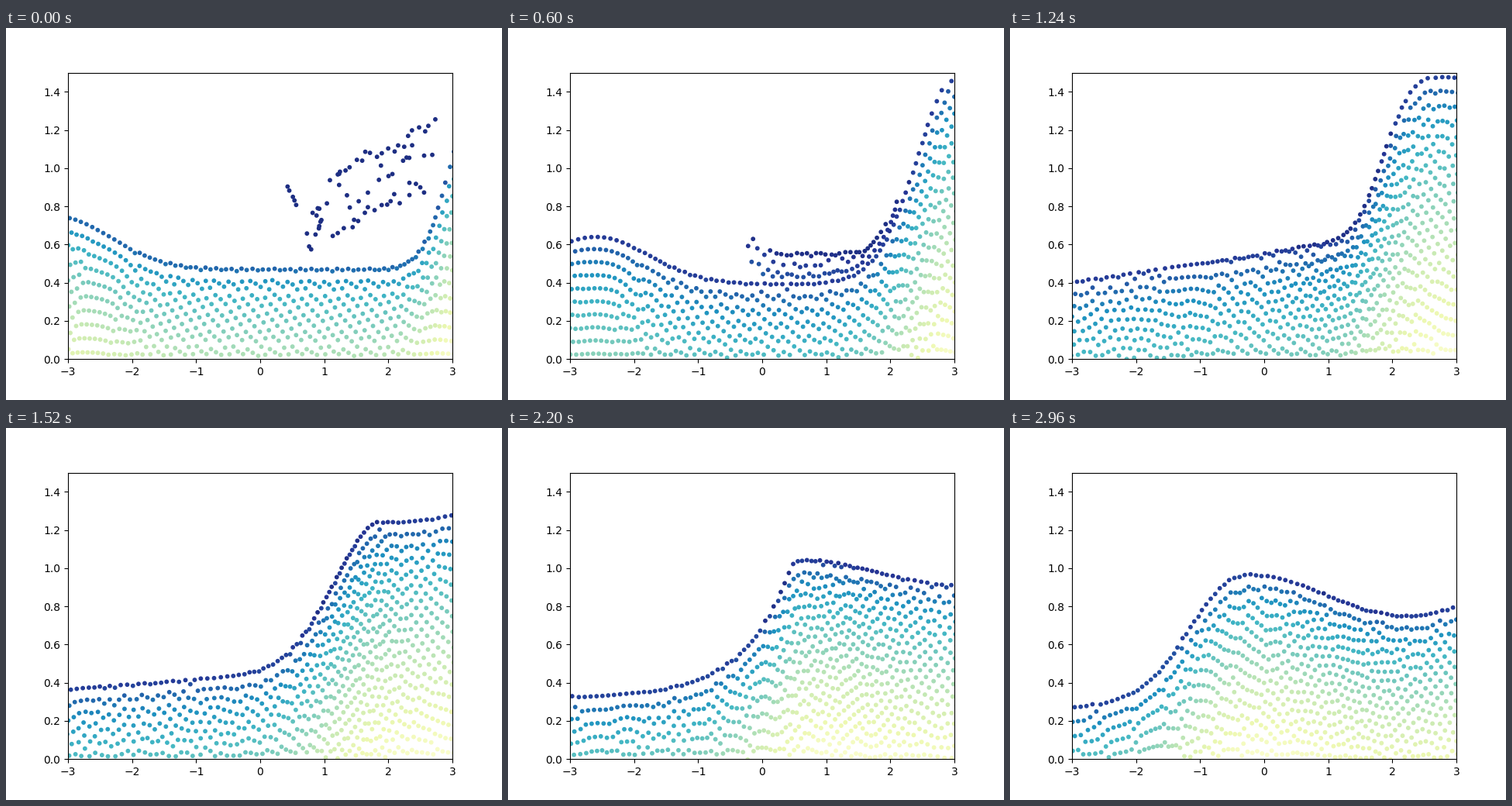
Write a matplotlib script that moves like this. It is 640 px wide and 480 px high and loops after 3000 ms.

```python
import numpy as np
import matplotlib.pyplot as plt
from matplotlib.animation import FuncAnimation

FRAMES, STEP = 75, 0.04
FLOOR = -0.05                       # the lowest row lies just below the axis
CELL = 0.0055                       # area per particle
GAP = np.sqrt(CELL * 1.155)         # spacing of an even packing
REACH = 1.3 * GAP
PUSH = 0.012
SPEED, REST = -1.4, 0.65            # wave speed and mean depth
LAND, SETTLE = 0.6, 0.8             # spray comes down, then joins the water

# Wave shape over time: crest position and height, level ahead of it,
# length and sharpness of the front, rise of the back
TIMES = [0, 0.6, 1.24, 1.8, 2.2, 2.52, 2.96]
WAVE = dict(
    crest=[3.2, 2.93, 2.75, 1.0, 0.5, 0.2, -0.3],
    height=[1.25, 1.47, 1.49, 1.0, 1.05, 1.05, 0.975],
    level=[0.48, 0.40, 0.41, 0.34, 0.33, 0.32, 0.28],
    length=[0.45, 0.78, 1.0, 1.0, 0.75, 0.95, 1.2],
    power=[1.6, 1.7, 3.0, 0.8, 1.0, 1.6, 2.0],
    back=[0, 0, 0, 0.2, -0.13, -0.23, -0.22],
)

GRID = np.linspace(-6, 6, 1201)
DX = GRID[1] - GRID[0]
BED = np.full_like(GRID, FLOOR)
rng = np.random.default_rng(4)


def at(x, values):
    return np.interp(x, GRID, values)


def blur(h, sigma):
    n = int(3 * sigma / DX)
    w = np.exp(-0.5 * (np.arange(-n, n + 1) * DX / sigma) ** 2)
    return np.convolve(np.pad(h, n, mode="edge"), w / w.sum(), mode="valid")


def surface(t):
    w = {name: np.interp(t, TIMES, v) for name, v in WAVE.items()}
    swell = 0.28 * max(1 - (t / 1.24) ** 3, 0)
    tilt = 0.05 * np.clip((t - LAND) / 0.2, 0, 1) * np.clip((1.8 - t) / 0.56, 0, 1)
    base = w["level"] + tilt * np.clip(GRID + 3, 0, 5)
    base += swell * np.exp(-((GRID + 3.2 - t) / 1.2) ** 2)
    ahead = np.clip(w["crest"] - GRID, 0, None)
    behind = np.clip(GRID - w["crest"], 0, 3.5)
    top = w["height"] + w["back"] * (1 - np.cos(np.pi * behind / 2.5)) / 2
    front = np.exp(-(ahead / w["length"]) ** w["power"])
    return blur(base + (top - base) * front, 0.04)


def relax(p, bed, top, lo, hi, rounds):
    """Spread particles evenly between bed and top by soft repulsion."""
    n = len(p)
    near = np.arange(-42, 43)
    for _ in range(rounds):
        q = p[np.argsort(p[:, 0], kind="stable")]
        other = q[(np.arange(n)[:, None] + near) % n]
        dx = q[:, :1] - other[..., 0]
        dy = q[:, 1:] - other[..., 1]
        r = np.sqrt(dx * dx + dy * dy) + 1e-6
        w = PUSH * np.clip(1 - r / REACH, 0, None) / r
        a, b = at(q[:, 0], bed), at(q[:, 0], top)
        # Mirror images across both limits keep rows from piling up there
        down, up = (PUSH * np.clip(1 - (2 * np.abs(d) + 0.6 * GAP) / REACH, 0, None)
                    for d in (b - q[:, 1], q[:, 1] - a))
        x = np.clip(q[:, 0] + (dx * w).sum(1), lo, hi)
        y = q[:, 1] + (dy * w).sum(1) + up - down
        p = np.column_stack([x, np.clip(y, at(x, bed), at(x, top))])
    return p


def streak(a, b, n, jitter):
    s = np.linspace(0, 1, n)[:, None]
    return np.array(a) + (np.array(b) - a) * s + rng.normal(0, jitter, (n, 2))


def throw_spray():
    """A hollow sheet curling off the crest, with a few stray drops ahead."""
    return np.vstack([
        streak((1.1, 0.94), (2.72, 1.24), 21, 0.018),
        streak((1.15, 0.66), (2.6, 0.92), 19, 0.025),
        streak((1.1, 0.82), (2.65, 1.07), 17, 0.06),
        streak((0.74, 0.61), (0.95, 0.79), 12, 0.04),
        streak((0.43, 0.89), (0.57, 0.81), 5, 0.01),
    ])


def land_spray(start):
    """Resting places: a thin layer on top of the water."""
    water = surface(LAND)
    bed = water + 0.025
    top = 0.56 + 0.09 * np.exp(-((GRID + 0.1) / 0.2) ** 2)
    top = np.maximum(top, bed + 0.05)
    x = start[:, 0] - 0.65
    f = np.clip((start[:, 1] - 0.6) / 0.4, 0, 1) ** 0.7
    y = at(x, bed) + f * (at(x, top) - at(x, bed))
    order = np.argsort(x)
    end = np.empty_like(start)
    end[order] = relax(np.column_stack([x, y]), bed, top, -0.22, 2.1, 40)[:len(x)]
    return end, top


def shade(p, t, h):
    wide = blur(h, 0.45)
    depth = np.clip(at(p[:, 0], h) - p[:, 1], 0, None)
    depth *= at(p[:, 0], wide) / at(p[:, 0], h)
    rel = np.clip(depth / wide[np.abs(GRID) <= 3].max(), 0, 1)
    skin = 0.1 + 0.12 * max(1 - t / 0.4, 0)
    return skin + (0.97 - skin) * rel ** 0.57


def simulate():
    heights = [surface(i * STEP) for i in range(FRAMES)]
    mass, inflow = [], 0.0
    for h in heights:
        m = np.cumsum(h - FLOOR) * DX
        mass.append(m - at(-3, m) - inflow)
        inflow += SPEED * (at(-3, h) - REST) * STEP
    m_lo = min(at(-3, m) for m in mass) - 0.05
    m_hi = max(at(3, m) for m in mass) + 0.05

    # Even start: columns of equal mass, golden-ratio depths
    n = int((m_hi - m_lo) / CELL)
    k = np.arange(n)
    x = np.interp(m_lo + (m_hi - m_lo) * (k + 0.5) / n, mass[0], GRID)
    y = FLOOR + (at(x, heights[0]) - FLOOR) * (k * 0.618034 % 1)
    p = np.column_stack([x, y])

    start = throw_spray()
    end, layer = land_spray(start)
    air = np.ones(len(start), bool)
    out = []
    for i, (h, m) in enumerate(zip(heights, mass)):
        t = i * STEP
        if i:
            # Columns keep their mass, depths scale with the surface
            rel = (p[:, 1] - FLOOR) / (at(p[:, 0], heights[i - 1]) - FLOOR)
            x = np.interp(at(p[:, 0], mass[i - 1]), m, GRID)
            p = np.column_stack([x, FLOOR + rel * (at(x, h) - FLOOR)])
        s = min(t / LAND, 1)
        drops = start + (end - start) * [s, 0.3 * s + 0.7 * s * s]
        down = air & ((drops[:, 1] <= at(drops[:, 0], h)) | (t >= SETTLE))
        p = np.vstack([p, drops[down]])
        air &= ~down
        lo, hi = np.interp([m_lo, m_hi], m, GRID)
        p = relax(p, BED, h, lo, hi, 8 if i else 160)
        drops = drops[air]
        tint = 0.09 + 0.9 * s * np.clip(at(drops[:, 0], layer) - drops[:, 1], 0, 0.25)
        out.append((np.vstack([p, drops]), np.append(shade(p, t, h), tint)))
    return out


states = simulate()

fig, ax = plt.subplots(figsize=(6.4, 4.8), dpi=100)
ax.set_xlim(-3, 3)
ax.set_ylim(0, 1.5)
dots = ax.scatter(*states[0][0].T, c=states[0][1], s=10, cmap="YlGnBu_r", vmin=0, vmax=1)


def update(i):
    points, values = states[i]
    dots.set_offsets(points)
    dots.set_array(values)
    return dots,


anim = FuncAnimation(fig, update, frames=FRAMES, interval=40, repeat=True, repeat_delay=0)
plt.show()
```
